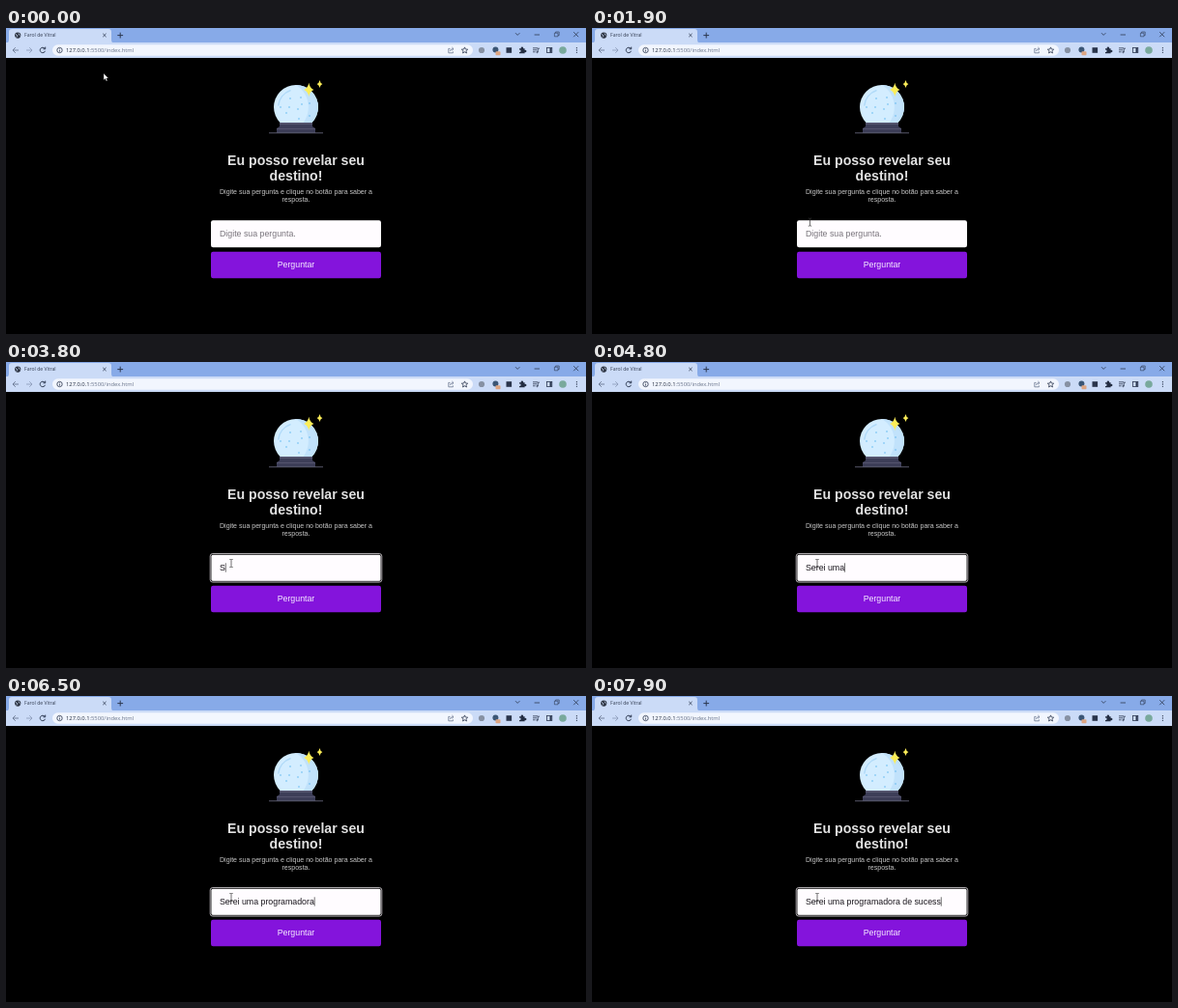
These frames come from a looping animation (600 px wide and 317 px high, 8 s). An HTML page:

```html
<!DOCTYPE html>
<html lang="pt-BR">
<head>
<meta charset="utf-8">
<title>Pergunta</title>
<style>
  html, body { margin: 0; width: 100%; height: 100%; overflow: hidden; background: #000; }
  svg { display: block; width: 100%; height: 100%; }
  text { font-family: "Liberation Sans", Arial, sans-serif; white-space: pre; }
  .ui { font-family: "Open Sans", "Noto Sans", sans-serif; }
  .mid { text-anchor: middle; }
  .line { fill: none; stroke: #2c3850; stroke-width: .8; }
</style>
</head>
<body>
<svg viewBox="0 0 600 317">
  <rect width="600" height="317"/>

  <!-- tab strip -->
  <rect width="600" height="16" fill="#87aae8"/>
  <path d="M0 15.5Q3 15.5 3 12V4Q3 1 6 1H106Q109 1 109 4V12Q109 15.5 112 15.5Z" fill="#cbdbf7"/>
  <circle cx="12.2" cy="7.6" r="3.1" fill="#2b3240"/>
  <path d="M10 6.6Q12 7 11.8 8.6L10.6 9.4M12.6 5.2Q14 6 13.6 7.2L14.6 8" fill="none" stroke="#cbdbf7" stroke-width=".8"/>
  <text class="ui" x="19" y="9.4" font-size="5.1" fill="#333d52">Farol de Vitral</text>
  <g class="line">
    <path d="M100.2 5.8L103.6 9.2M103.6 5.8L100.2 9.2"/>
    <path d="M115.3 7.6H121.1M118.2 4.7V10.5" stroke-width="1"/>
    <path d="M527 5.2L529.2 7.4L531.4 5.2M546.6 7H552"/>
    <path d="M567.4 5.2H571V8.8H567.4ZM568.6 5.2V4H572.2V7.6H571" stroke-width=".6"/>
    <path d="M587.2 4.2L592.2 9.2M592.2 4.2L587.2 9.2"/>
  </g>

  <!-- toolbar -->
  <rect y="15" width="600" height="16" fill="#cbdbf7"/>
  <g class="line">
    <path d="M13 23H7M9.8 20.2L7 23L9.8 25.8" stroke="#5d6b86"/>
    <path d="M21 23H27M24.2 20.2L27 23L24.2 25.8" stroke="#8998b5"/>
    <path d="M40 21.2A2.7 2.7 0 1 0 40.5 23.8M40.7 19.6V21.8H38.5" stroke-width="1"/>
  </g>
  <rect x="48" y="17.3" width="435" height="11.4" rx="5.7" fill="#f2f6fe"/>
  <g class="line" stroke-width=".6">
    <circle cx="55.5" cy="23" r="2.7"/>
    <path d="M55.5 22.6V24.6M55.5 21.2V21.8"/>
    <path d="M459.4 21.4H457.8V25.8H462.4V24.4M459.4 24Q459.6 21.6 462.8 21.6M461.4 20L463 21.6L461.4 23.2" stroke="#68758f"/>
    <path d="M474.5 19.9L475.4 22L477.7 22.2L475.9 23.7L476.5 26L474.5 24.8L472.5 26L473.1 23.7L471.3 22.2L473.6 22Z"/>
  </g>
  <text class="ui" x="62" y="25.1" font-size="5.8" fill="#202a3c">127.0.0.1<tspan fill="#69748a">:5500/index.html</tspan></text>
  <circle cx="492" cy="23" r="3.1" fill="#8791a3"/>
  <circle cx="506.4" cy="22.4" r="3" fill="#3b5675"/>
  <rect x="506.5" y="24.3" width="5" height="4" rx=".8" fill="#dda582"/>
  <rect x="517.5" y="20.2" width="5.6" height="5.6" fill="#29344b"/>
  <path d="M531 21.2H532.8A1.2 1.2 0 1 1 535 21.2H536.6V23A1.2 1.2 0 1 1 536.6 25V26.2H531V24.7A1.1 1.1 0 1 0 531 22.7Z" fill="#232d42"/>
  <g class="line" stroke-width="1">
    <path d="M545 20.8H550M545 22.8H549M545 24.8H547.6M550.2 25V21.2H552"/>
    <circle cx="549.5" cy="25" r=".7"/>
    <rect x="559.4" y="20.4" width="5.4" height="5.2"/>
    <path d="M563.5 20.5V25.5" stroke-width="2"/>
  </g>
  <circle cx="576" cy="23" r="3.8" fill="#79a99c"/>
  <g fill="#2c3850">
    <circle cx="590.4" cy="20.7" r=".65"/><circle cx="590.4" cy="23" r=".65"/><circle cx="590.4" cy="25.3" r=".65"/>
  </g>

  <!-- crystal ball -->
  <circle cx="300" cy="82" r="23" fill="#d3edff"/>
  <path d="M300 59A23 23 0 0 1 300 105A27 27 0 0 0 300 59Z" fill="#c1e2fb"/>
  <path d="M281.8 80A18.5 18.5 0 0 1 294 64.7" fill="none" stroke="#b0daf8" stroke-width="1.5" stroke-linecap="round"/>
  <g id="specks" fill="#58b4ee"></g>
  <path d="M283 98H317V102L320 104V109H280V104L283 102Z" fill="#3d3e58"/>
  <path d="M283 98H317V100H283ZM280 104H320V105H280Z" fill="#54546d"/>
  <path d="M272 108.7H328" stroke="#58586b" stroke-width="1.1"/>
  <g id="stars" fill="#fbed58"></g>

  <!-- page text and form -->
  <g class="mid" fill="#e2e2e2" font-size="14.1" font-weight="700">
    <text x="300" y="141.7">Eu posso revelar seu</text>
    <text x="300" y="158">destino!</text>
  </g>
  <g class="mid" fill="#c9c9c9" font-size="7.04">
    <text x="300" y="172">Digite sua pergunta e clique no botão para saber a</text>
    <text x="300" y="180">resposta.</text>
  </g>
  <rect x="212" y="199.3" width="176" height="28" rx="2.2" fill="#fffcff"/>
  <g id="ring" fill="none">
    <rect x="212" y="199.3" width="176" height="28" rx="2" stroke="#111" stroke-width=".9"/>
    <rect x="211.2" y="198.5" width="177.6" height="29.6" rx="2.6" stroke="#f4eef4" stroke-width=".7"/>
  </g>
  <text id="entry" x="221" y="216" font-size="8.8"></text>
  <path id="caret" d="M0 208.3V217.7" stroke="#111" stroke-width=".6"/>
  <rect x="212" y="231.7" width="176" height="27.6" rx="2.2" fill="#8414dc"/>
  <text class="mid" x="300" y="248.2" font-size="8.8" fill="#f6ecff">Perguntar</text>

  <!-- pointers, hot spot at 0,0 -->
  <path id="arrow" d="M0 0V7L1.6 5.5L2.7 8L3.9 7.5L2.8 5.1H5Z" fill="#fff" stroke="#222" stroke-width=".4"/>
  <path id="beam" d="M-1.7 -4H-.5L0 -3.6L.5 -4H1.7M0 -3.6V3.6M-1.7 4H-.5L0 3.6L.5 4H1.7" fill="none" stroke="#333" stroke-width=".7"/>
</svg>
<script>
const LOOP = 8000, STEP = 100, FOCUS = 3300;
const HINT = "Digite sua pergunta.";
const PHRASE = "Serei uma programadora de sucess";
// one key time per letter, in tenths of a second
const KEYS = [38, 40, 41, 43, 44, 45, 46, 47, 48, 49, 50, 54, 55, 56, 57, 57, 58,
  59, 60, 61, 62, 65, 66, 68, 69, 71, 72, 73, 74, 76, 77, 79];
// pointer path: time, x, y
const PATH = [[0, 101, 47], [1100, 101, 47], [1200, 102, 47], [2000, 231, 208],
  [2200, 231, 208], [2700, 232, 209], [3000, 233, 208.5], [LOOP, 233, 208.5]];

const $ = id => document.getElementById(id);
const show = (el, on) => el.setAttribute("visibility", on ? "visible" : "hidden");
const ease = u => u * u * (3 - 2 * u);

const star = (x, y, w, h) =>
  `<path d="M${x} ${y - h}Q${x + w * .2} ${y - h * .2} ${x + w} ${y}Q${x + w * .2} ${y + h * .2} ${x} ${y + h}` +
  `Q${x - w * .2} ${y + h * .2} ${x - w} ${y}Q${x - w * .2} ${y - h * .2} ${x} ${y - h}Z"/>`;

$("stars").innerHTML = star(313.3, 64, 5.2, 7.2) + star(324.5, 58, 2.9, 4.1);
$("specks").innerHTML = [[294, 73], [305, 72], [290, 88], [302, 84], [314, 78], [306, 79], [303, 94], [314, 91], [284, 82], [293, 82]]
  .map(([x, y]) => `<circle cx="${x}" cy="${y}" r=".75"/>`).join("");

function pointerAt(t) {
  const i = PATH.findIndex(p => p[0] > t);
  const [t0, x0, y0] = PATH[i - 1], [t1, x1, y1] = PATH[i];
  const u = ease((t - t0) / (t1 - t0));
  return [x0 + (x1 - x0) * u, y0 + (y1 - y0) * u];
}

function draw(time) {
  const t = Math.floor(time % LOOP / STEP) * STEP;
  const typed = PHRASE.slice(0, KEYS.filter(k => k * 100 <= t).length);
  const entry = $("entry");
  entry.textContent = typed || HINT;
  entry.setAttribute("fill", typed ? "#17131a" : "#77737a");

  const end = typed ? entry.getComputedTextLength() : 0;
  $("caret").setAttribute("transform", `translate(${221.4 + end} 0)`);
  show($("caret"), t >= FOCUS);
  show($("ring"), t >= FOCUS);

  const [x, y] = pointerAt(t);
  const inField = x > 212 && x < 388 && y > 199 && y < 227;
  for (const id of ["arrow", "beam"]) {
    $(id).setAttribute("transform", `translate(${x} ${y})`);
    show($(id), (id === "beam") === inField);
  }
}

const start = performance.now();
function tick(now) {
  draw(Math.max(0, now - start));
  requestAnimationFrame(tick);
}
tick(start);
</script>
</body>
</html>
```
